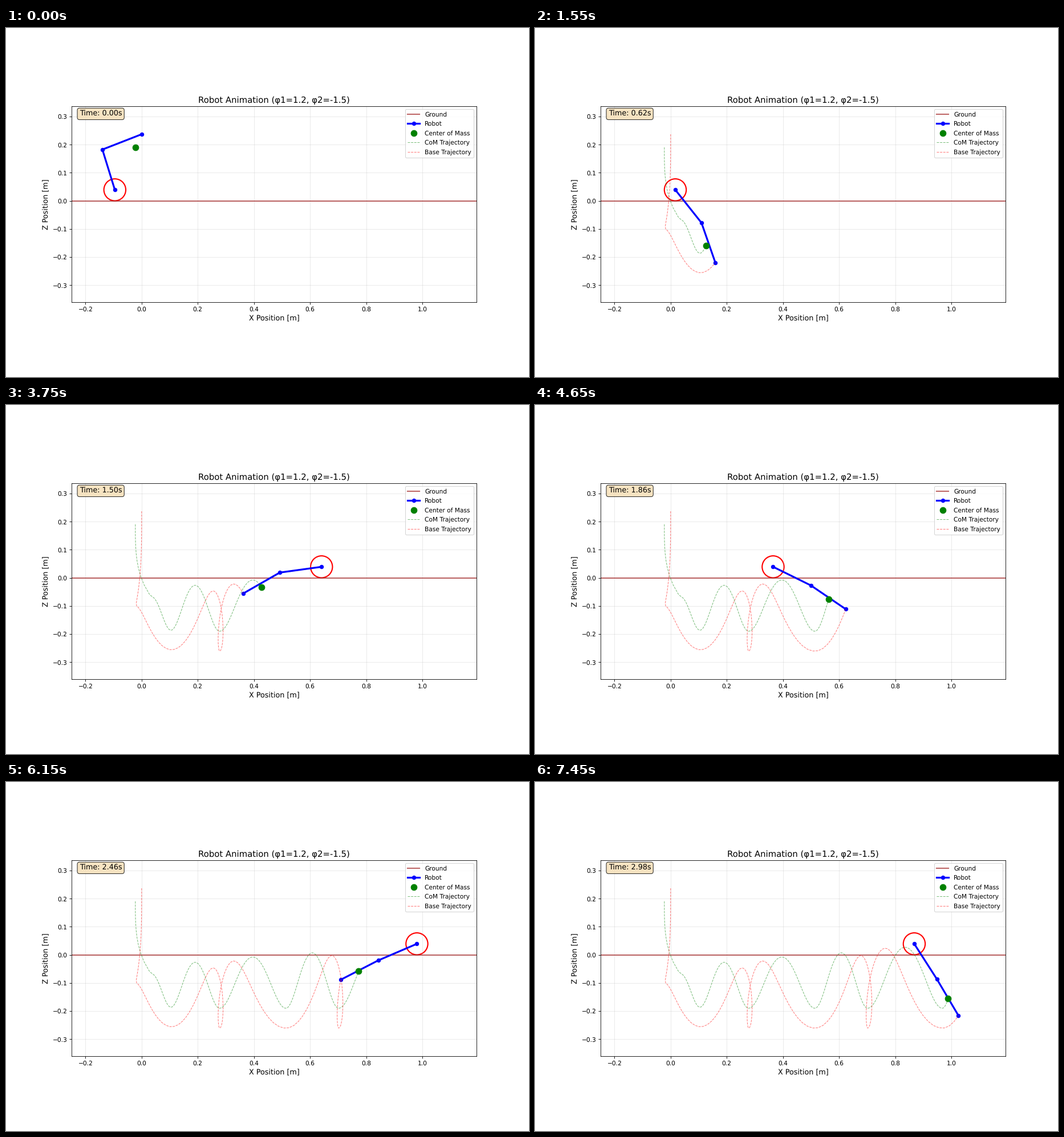
A matplotlib script that plays this animation: 917x611 px, repeating every 7.5 s.

```python
import numpy as np
import matplotlib.pyplot as plt
from matplotlib.animation import FuncAnimation

W, H, DPI = 917, 611, 76.4
FRAMES, STEP = 150, 0.02
LINK = 0.15          # length of each leg link
HUB = 0.0393         # height of the wheel axle
SHARE = 0.235        # position of the CoM between base and wheel
BASE_Z = 0.237
LANDING = 0.285      # end of the first fall
GRAVITY = 8.34       # effective, slowed by the folding leg

# Half swings: moment the leg hangs straight, CoM x there,
# peak lean and peak knee bend of the swing that follows (degrees)
START, COM_X, LEAN, BEND = np.array([
    (0.028, -0.034, 60, 12),
    (0.542, 0.103, -72.6, 17),
    (1.142, 0.278, 78, -12),
    (1.707, 0.514, -82, 5.5),
    (2.295, 0.702, 87, -2.7),
    (2.912, 0.968, -92, 3),
    (3.520, 1.150, 0, 0),
]).T


def fall(t):
    """Base drops while the leg folds and the wheel slides past below it."""
    ease = (t / LANDING) ** 6.5
    dx = -0.0955 + 0.334 * ease
    dz = HUB - BASE_Z + GRAVITY * t * t / 2
    bend = np.arccos(np.hypot(dx, dz) / (2 * LINK))
    return -0.0224 + 0.057 * ease, np.arctan2(dx, dz), bend


def swing(t):
    """Leg swings like a pendulum while the CoM drifts to the right."""
    k = np.searchsorted(START, t, side="right") - 1
    wave = np.sin(np.pi * (t - START[k]) / (START[k + 1] - START[k]))
    crouch = 10.6 * np.exp(-max(0, t - START[1]) / 0.06)
    lean, bend = np.radians((LEAN[k] * wave, BEND[k] * wave + crouch))
    return np.interp(t, START, COM_X), lean, bend


def pose(t):
    """Base, knee, wheel and CoM positions at time t."""
    com_x, lean, bend = fall(t) if t < LANDING else swing(t)
    leg = 2 * LINK * np.cos(bend) * np.array((np.sin(lean), np.cos(lean)))
    base = np.array((com_x - SHARE * leg[0], HUB - leg[1]))
    knee = base + LINK * np.array((np.sin(lean + bend), np.cos(lean + bend)))
    return base, knee, base + leg, base + SHARE * leg


poses = np.array([pose(i * STEP) for i in range(FRAMES)])

plt.rcParams.update({"font.family": "DejaVu Sans", "text.hinting": "none"})
# tiny margin keeps the pixel size from rounding down
fig, ax = plt.subplots(figsize=((W + 1e-3) / DPI, (H + 1e-3) / DPI), dpi=DPI)
ax.set_xlim(-0.2503, 1.1937)
ax.set_ylim(-0.361, 0.337)
ax.set_aspect("equal")
ax.set_xticks(np.linspace(-0.2, 1.0, 7).round(1))
ax.set_yticks(np.linspace(-0.3, 0.3, 7).round(1))
ax.grid(True, alpha=0.3)
ax.set_title("Robot Animation (φ1=1.2, φ2=-1.5)", fontsize=14, pad=5.2)
ax.set_xlabel("X Position [m]", fontsize=12, labelpad=3.5)
ax.set_ylabel("Z Position [m]", fontsize=12)

ax.axhline(0, color="brown", lw=2, alpha=0.7, label="Ground")
robot, = ax.plot([], [], "bo-", lw=3, markersize=6, label="Robot")
com, = ax.plot([], [], "go", markersize=10, label="Center of Mass")
com_path, = ax.plot([], [], "g--", lw=1, alpha=0.5, label="CoM Trajectory")
base_path, = ax.plot([], [], "r--", lw=1, alpha=0.5, label="Base Trajectory")
wheel = ax.add_patch(plt.Circle((0, HUB), 0.039, fill=False, color="red", lw=2))
clock = ax.text(0.02, 0.95, "", transform=ax.transAxes, fontsize=12,
                bbox=dict(boxstyle="round", facecolor="wheat", alpha=0.8))
ax.legend(loc="upper right", labelspacing=0.55)


def update(i):
    robot.set_data(*poses[i, :3].T)
    com.set_data(*poses[i, 3:].T)
    com_path.set_data(*poses[:i + 1, 3].T)
    base_path.set_data(*poses[:i + 1, 0].T)
    wheel.center = tuple(poses[i, 2])
    clock.set_text(f"Time: {i * STEP:.2f}s")
    return robot, com, com_path, base_path, wheel, clock


anim = FuncAnimation(fig, update, frames=FRAMES, interval=50, repeat=True)
plt.show()
```
